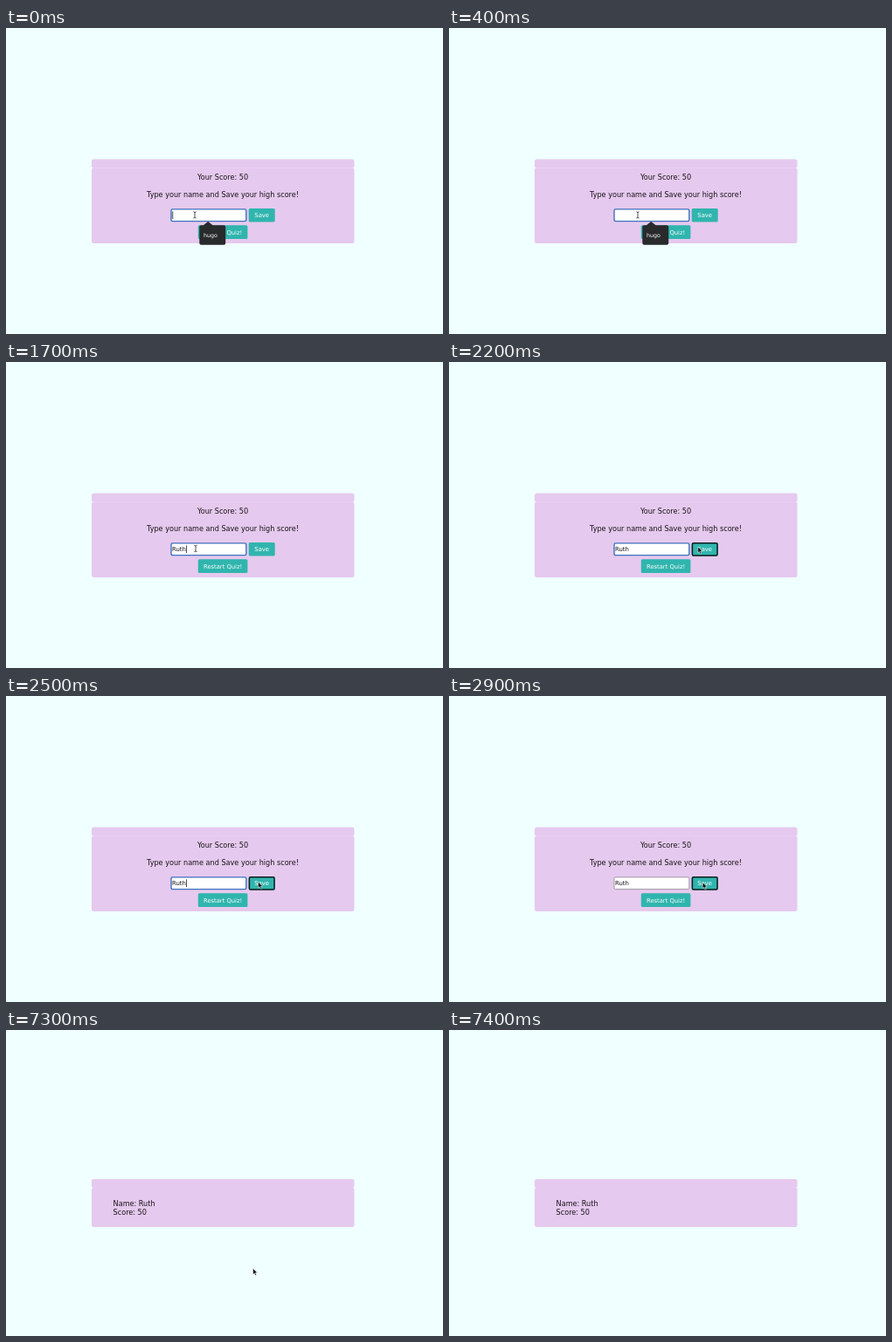
An HTML page that plays this animation: 500x351 px, repeating every 7.6 s.

```html
<!DOCTYPE html>
<html lang="en">
<head>
<meta charset="utf-8">
<title>Quiz score</title>
<style>
  html, body { margin: 0; width: 100%; height: 100%; overflow: hidden; background: #f0ffff; }
  svg { display: block; width: 100vw; height: 100vh; }
  text { font-family: "DejaVu Sans", Verdana, sans-serif; font-size: 8.12px; fill: #171319; white-space: pre; }
  .mid { text-anchor: middle; }
  .small { font-size: 6.85px; }
  .light { fill: #fff; }
  .panel { fill: #e6c9ee; }
  .button { fill: #30b5ae; }
</style>
</head>
<body>
<svg viewBox="0 0 500 351">
  <rect width="500" height="351" fill="#f0ffff"/>

  <g id="form">
    <rect class="panel" x="98" y="150.5" width="300.5" height="10" rx="2.5"/>
    <rect class="panel" x="98" y="160.2" width="300.5" height="86.8" rx="2.5"/>
    <text class="mid" x="248" y="173.5">Your Score: 50</text>
    <text class="mid" x="248" y="194">Type your name and Save your high score!</text>
    <rect id="field" x="189" y="207.9" width="85.8" height="13.7" rx="1.5" fill="#fff"/>
    <text id="typed" class="small" x="190" y="217.2"></text>
    <rect id="caret" y="210.4" width="0.8" height="8.6" fill="#222"/>
    <rect id="save" class="button" x="277.7" y="207" width="30" height="15.6" rx="1.5"/>
    <rect id="outline" x="278.4" y="207.7" width="28.6" height="14.2" rx="1.5" fill="none" stroke="#101c1e" stroke-width="1.5"/>
    <text class="mid small light" x="292.7" y="217.2">Save</text>
    <rect class="button" x="219.8" y="226.2" width="56.6" height="15.8" rx="1.5"/>
    <text class="mid small light" style="font-size:6.75px" x="248.1" y="236.7">Restart Quiz!</text>
    <g id="tip">
      <path d="M223.3 226.3H225.8L231.2 222L236.6 226.3H249.2Q251.2 226.3 251.2 228.3V246.8Q251.2 248.8 249.2 248.8H223.3Q221.3 248.8 221.3 246.8V228.3Q221.3 226.3 223.3 226.3Z" fill="#282a2b"/>
      <text class="mid light" style="font-size:6.3px" x="234" y="240">hugo</text>
    </g>
  </g>

  <g id="result">
    <rect class="panel" x="98" y="171" width="300.5" height="10" rx="2.5"/>
    <rect class="panel" x="98" y="180.7" width="300.5" height="45.3" rx="2.5"/>
    <text x="122.6" y="202">Name: Ruth</text>
    <text x="122.6" y="211.8">Score: 50</text>
  </g>

  <path id="beam" d="M-1.6 -3.6Q0 -3.6 0 -2.6Q0 -3.6 1.6 -3.6M0 -2.6V2.6M-1.6 3.6Q0 3.6 0 2.6Q0 3.6 1.6 3.6" fill="none" stroke="#222" stroke-width="0.8"/>
  <path id="arrow" d="M0 0V7L1.6 5.5L2.8 8.2L4 7.7L2.8 5.1H5Z" fill="#080808" stroke="#fff" stroke-width="0.5" stroke-linejoin="round"/>
</svg>
<script>
  const LOOP = 7600;
  const NAME = "Ruth";
  const KEYS = [800, 1000, 1200, 1400];
  const CARET_ON = [[0, 400], [800, 1900], [2400, 2800]];
  // pointer stops: time, x, y
  const PATH = [
    [1700, 217, 214], [1800, 228, 214], [1900, 246, 213.5], [2000, 264, 213],
    [2100, 279, 212.5], [2200, 284.8, 212], [2400, 287, 212.5], [2600, 290.2, 213.8]
  ];
  const el = id => document.getElementById(id);
  const show = (id, on) => el(id).setAttribute("display", on ? "inline" : "none");
  const place = (id, x, y) => el(id).setAttribute("transform", `translate(${x} ${y})`);

  function pointer(t) {
    if (t < 800) return [216, 214.4];
    if (t < 1700 || t >= 7400) return null;
    if (t >= 7300) return [282.6, 273.4];
    const i = PATH.findLastIndex(p => p[0] <= t);
    const [t0, x0, y0] = PATH[i];
    if (i === PATH.length - 1) return [x0, y0];
    const [t1, x1, y1] = PATH[i + 1];
    const k = (t - t0) / (t1 - t0);
    return [x0 + (x1 - x0) * k, y0 + (y1 - y0) * k];
  }

  function draw(time) {
    const t = Math.floor((time % LOOP) / 100) * 100;
    const saved = t >= 3000;
    show("form", !saved);
    show("result", saved);
    show("tip", t < 800);

    const typed = NAME.slice(0, KEYS.filter(k => k <= t).length);
    el("typed").textContent = typed;
    const width = typed && !saved ? el("typed").getComputedTextLength() : 0;
    el("caret").setAttribute("x", 190.4 + width);
    show("caret", CARET_ON.some(([a, b]) => t >= a && t < b));

    const focused = t < 2800;
    el("field").setAttribute("stroke", focused ? "#3d72bd" : "#8d8692");
    el("field").setAttribute("stroke-width", focused ? 1.4 : 0.8);

    const pos = pointer(t);
    const inField = pos && !saved && pos[0] < 275;
    show("outline", pos && !saved && pos[0] > 278);
    show("beam", inField);
    show("arrow", pos && !inField);
    if (pos) place(inField ? "beam" : "arrow", ...pos);
  }

  const start = performance.now();
  function tick() {
    draw(performance.now() - start);
    requestAnimationFrame(tick);
  }
  tick();
</script>
</body>
</html>
```
